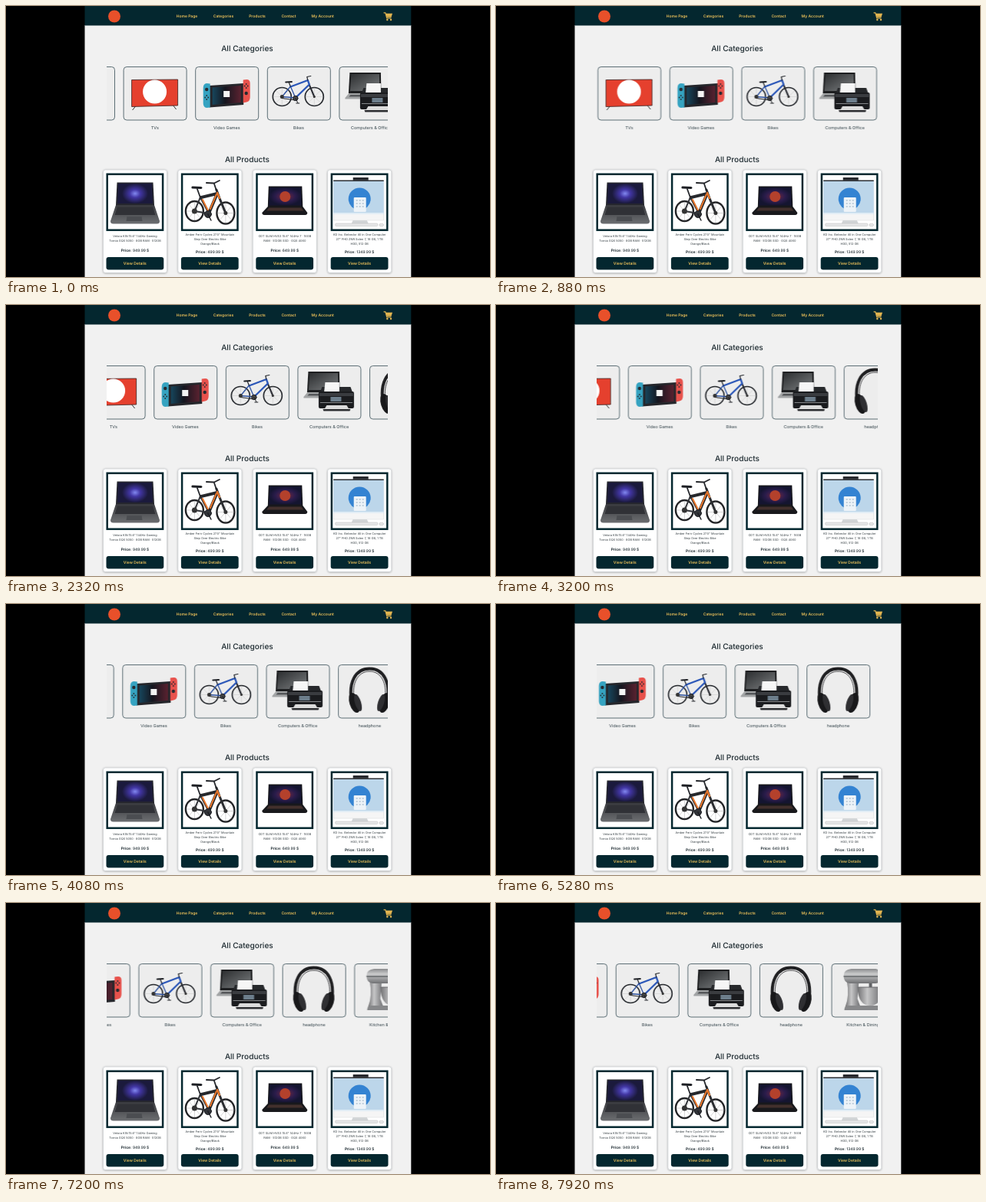
An HTML page for the animation above (8000 ms loop, 630 by 354 pixels).

```html
<!DOCTYPE html>
<html lang="en">
<head>
<meta charset="utf-8">
<title>Shop</title>
<style>
html, body { margin: 0; width: 100%; height: 100%; overflow: hidden; background: #000; }
svg { display: block; width: 630px; height: 354px; }
text { font-family: Inter, "Open Sans", sans-serif; text-anchor: middle; text-rendering: geometricPrecision; fill: #1d2a30; }
.nav text, .btn { font-size: 5px; font-weight: 600; fill: #efc25a; }
.head { font-size: 10.1px; font-weight: 500; }
.label { font-size: 5.5px; font-weight: 400; fill: #33434a; }
.desc { font-size: 3.9px; fill: #333c40; }
.price { font-size: 4.9px; font-weight: 500; }
.price tspan { font-weight: 700; }
#track { animation: slide 8s steps(100) infinite; }
@keyframes slide { to { transform: translateX(-186px); } }
</style>
</head>
<body>
<svg viewBox="0 0 630 354">
  <defs>
    <clipPath id="strip"><rect x="131.5" y="76" width="365.5" height="90"/></clipPath>
    <linearGradient id="steel">
      <stop offset="0" stop-color="#707072"/><stop offset=".4" stop-color="#c6c6c7"/><stop offset="1" stop-color="#6a6b6e"/>
    </linearGradient>
    <linearGradient id="chrome" x2="0" y2="1">
      <stop offset="0" stop-color="#8a8b8d"/><stop offset=".35" stop-color="#c9cacb"/><stop offset="1" stop-color="#707174"/>
    </linearGradient>
    <linearGradient id="glass" x2="1" y2="1">
      <stop offset="0" stop-color="#2d2f31"/><stop offset="1" stop-color="#7b7e80"/>
    </linearGradient>
    <linearGradient id="play">
      <stop offset="0" stop-color="#17465c"/><stop offset=".45" stop-color="#15161f"/><stop offset="1" stop-color="#5a2230"/>
    </linearGradient>
    <linearGradient id="deck" x2="0" y2="1">
      <stop offset="0" stop-color="#3a3b3f"/><stop offset="1" stop-color="#6c6e71"/>
    </linearGradient>
    <radialGradient id="violet">
      <stop offset="0" stop-color="#8288f0"/><stop offset=".4" stop-color="#4236a4"/><stop offset="1" stop-color="#1b1a3c"/>
    </radialGradient>
    <radialGradient id="ember">
      <stop offset="0" stop-color="#7a2a3c"/><stop offset=".6" stop-color="#2b1c4c"/><stop offset="1" stop-color="#141530"/>
    </radialGradient>
    <filter id="soft" x="-10%" y="-10%" width="120%" height="120%"><feDropShadow dx="0" dy=".5" stdDeviation="1" flood-opacity=".35"/></filter>

    <g id="tv">
      <path d="M16 52l-4 5M65 51l4 5" stroke="#333" fill="none"/>
      <path d="M11 17.5L71 17V51L11 52.5Z" fill="#e5402e" stroke="#3a2020" stroke-width=".8"/>
      <circle cx="41" cy="33" r="15.5" fill="#fff"/>
    </g>

    <g id="console">
      <path d="M18.5 25L63 22V50L18.5 53.5Z" fill="#25262b"/>
      <path d="M22.500 27.500L59.500 25V47L22.500 50Z" fill="url(#play)"/>
      <rect x="37" y="32" width="8" height="8" fill="#f4f4f4"/>
      <path d="M19.500 22.500V53.500L15 54Q10.500 53.500 10.500 48V28Q10.500 22.500 15 22Z" fill="#35a3c1"/>
      <path d="M62.500 17.500L67 17Q71.500 17 71.500 22V40Q71.500 45.500 67 46.500L62.500 47.500Z" fill="#e8524c"/>
      <g fill="#262a30">
        <circle cx="15" cy="30" r="2.200"/><circle cx="66.500" cy="35" r="2.200"/>
        <circle cx="15" cy="38" r=".9"/><circle cx="15" cy="43" r=".9"/><circle cx="13" cy="40.500" r=".9"/><circle cx="17" cy="40.500" r=".9"/>
        <circle cx="66.500" cy="23" r=".9"/><circle cx="66.500" cy="28" r=".9"/><circle cx="64.500" cy="25.500" r=".9"/><circle cx="68.500" cy="25.500" r=".9"/>
      </g>
    </g>

    <g id="bike" fill="none" stroke-linecap="round" stroke-linejoin="round">
      <g stroke="#24272c" stroke-width="1.700"><circle cx="19.500" cy="39.500" r="12"/><circle cx="61.500" cy="39.500" r="12"/></g>
      <path d="M19.500 28V51M8 39.500H31M11.500 31.500L27.500 47.500M27.500 31.500L11.500 47.500M61.500 28V51M50 39.500H73M53.500 31.500L69.500 47.500M69.500 31.500L53.500 47.500" stroke="#aaa" stroke-width=".3"/>
      <path d="M55 24L61.500 39.500" stroke="#2a2c33" stroke-width="2"/>
      <path d="M19.500 39.500L30.500 26L37 41Z" stroke="#2b50a0" stroke-width="1.300"/>
      <path d="M37 41L55 23.500L53 18L30.500 26.500" stroke="#2a56b8" stroke-width="2.300"/>
      <path d="M30.500 26L28.500 21M53 18L52 13.500L57 12.500M19.500 41.500L37 44" stroke="#23262b" stroke-width="1.200"/>
      <path d="M24.500 20.500L32 20" stroke="#1d1f24" stroke-width="2.200"/>
      <circle cx="37" cy="41.500" r="3.200" fill="#444" stroke="#1d1f24"/>
      <circle cx="19.500" cy="39.500" r="2.500" fill="#333"/><circle cx="61.500" cy="39.500" r="1.500" fill="#333"/>
      <path d="M37 41.500L40 47.500M38 48H42" stroke="#1d1f24"/>
    </g>

    <g id="office">
      <path d="M13 35L8 41V42.500H44V34Z" fill="#a2a4a5"/>
      <path d="M15 37H34L32 39.500H13Z" fill="#55575a"/>
      <path d="M14 8H54.500L55 35H12.500Z" fill="#1e1f21"/>
      <path d="M16 10H52.500L53 32H14.500Z" fill="url(#glass)"/>
      <path d="M32 28H69L72 36H29Z" fill="#26282b"/>
      <path d="M36 22H54.500V36H34.500Z" fill="#f6f6f6"/>
      <rect x="27.500" y="34" width="46" height="22" rx="2" fill="#1b1c1f"/>
      <rect x="28.500" y="36" width="44" height="4" fill="#3a3c40"/>
      <rect x="43" y="41" width="14" height="6" fill="#6d7e8c"/>
      <rect x="29.500" y="48" width="42" height="1" fill="#85888b"/>
      <path d="M38 52H64L67 57H35Z" fill="#dcdcdc"/>
      <path d="M33 57H69L68 59.500H34Z" fill="#2c2d30"/>
    </g>

    <g id="phones">
      <path d="M17.500 47C14 24 22 5.500 41 5.500S68 24 64.500 47" fill="none" stroke="#202022" stroke-width="4"/>
      <path d="M20.500 40C19 21 28 9 41 9S63 21 61.500 40" fill="none" stroke="#454548" stroke-width="1"/>
      <g fill="#18181a">
        <ellipse cx="21.500" cy="50" rx="6.500" ry="13.500" transform="rotate(-17 21.500 50)"/>
        <ellipse cx="60.500" cy="50" rx="6.500" ry="13.500" transform="rotate(17 60.500 50)"/>
      </g>
      <g fill="#2f2f32">
        <ellipse cx="26" cy="50" rx="4" ry="11.500" transform="rotate(-17 26 50)"/>
        <ellipse cx="56" cy="50" rx="4" ry="11.500" transform="rotate(17 56 50)"/>
      </g>
    </g>

    <g id="mixer">
      <path d="M20 22H36L34 46L38 57H18Q24 42 20 22Z" fill="url(#steel)"/>
      <path d="M17 60Q17 55 23 55H66V61H17Z" fill="#87888a"/>
      <path d="M51 25V36" stroke="#5f6164" stroke-width="4"/>
      <path d="M34 31H66Q66 55 50.500 55T34 31Z" fill="url(#steel)"/>
      <path d="M34 31H66" stroke="#6a6b6e" stroke-width="1"/>
      <path d="M16 16Q16 8 26 7H58Q67 9 67 17T58 26H24Q16 25 16 16Z" fill="url(#chrome)"/>
      <path d="M16 17H67" stroke="#66686b" stroke-width="1.500"/>
    </g>

    <g id="laptopA">
      <path d="M14 11.500H61L62.500 41H12.500Z" fill="#25262e"/>
      <path d="M15.500 13H59.500L60.500 39H14.500Z" fill="#1b1a3c"/>
      <ellipse cx="37.500" cy="26" rx="17" ry="13" fill="url(#violet)"/>
      <path d="M12.500 41H62.500L69.500 62Q69.500 65.500 66 65.500H9Q5.500 65.500 5.500 62Z" fill="url(#deck)"/>
      <path d="M14.500 43.500H60.500L64 54H11Z" fill="#303136"/>
      <path d="M27 56H46L47 62H26Z" fill="#4b4d51"/>
    </g>

    <g id="ebike" fill="none" stroke-linecap="round" stroke-linejoin="round">
      <g stroke="#222326" stroke-width="2.400"><ellipse cx="17.500" cy="49" rx="11.500" ry="13"/><ellipse cx="58" cy="51.500" rx="11.500" ry="14"/></g>
      <path d="M17.500 37V61M7 49H28M10 40L25 58M25 40L10 58M58 38V65M47 51.500H69M50 42L66 61M66 42L50 61" stroke="#999" stroke-width=".4"/>
      <path d="M46 21L50 32L58 51.500" stroke="#2b2d31" stroke-width="3"/>
      <path d="M17.500 49L25 31L36 52Z" stroke="#33353a" stroke-width="2"/>
      <path d="M36 52L47 26L26 31" stroke="#26282c" stroke-width="4"/>
      <path d="M38 46L46 27M28 34L35 48" stroke="#e9762a" stroke-width="2"/>
      <path d="M47 25L50 32" stroke="#e9762a" stroke-width="2.400"/>
      <path d="M25 31L21 20M46 22L43 13M33 12L43 12.500L50 9" stroke="#24262b" stroke-width="1.800"/>
      <path d="M15 18L26 18.500" stroke="#1d1f24" stroke-width="3"/>
      <circle cx="35" cy="53" r="4.500" fill="#33353a" stroke="#1d1f24"/>
      <path d="M35 53L39 61" stroke="#1d1f24" stroke-width="1.500"/>
      <circle cx="17.500" cy="49" r="3.500" fill="#333"/><circle cx="58" cy="51.500" r="2.500" fill="#333"/>
    </g>

    <g id="laptopB">
      <path d="M16.500 16.500H60L61 43H15.500Z" fill="#17171c"/>
      <path d="M18 18H58.500L59.500 41.500H17Z" fill="url(#ember)"/>
      <circle cx="38" cy="30" r="7" fill="#b4412c"/>
      <path d="M15.500 43H61L67 51Q67 54 64 54H11Q8 54 8 51Z" fill="#19191c"/>
      <path d="M17 44.500H59L62 48.500H14Z" fill="#42302c"/>
    </g>

    <g id="desktop">
      <rect x="29" y="5" width="20" height="5" fill="#26282c"/>
      <path d="M30 58H46L49 65.500H27Z" fill="#d2d5d7"/>
      <rect x="3.500" y="9" width="65.500" height="52" fill="#f5f5f5" stroke="#d5d8da" stroke-width=".5"/>
      <rect x="3.500" y="9" width="65.500" height="44" fill="#bcd6ea"/>
      <rect x="3.500" y="8.500" width="65.500" height="1.500" fill="#2d3136"/>
      <circle cx="37.500" cy="33" r="14.500" fill="#3483d2"/>
      <rect x="30" y="31" width="16" height="19" rx="1" fill="#edf3f8"/>
      <path d="M33 35H43M33 39H43M33 43H43" stroke="#90a9bd" stroke-dasharray="2 2"/>
      <rect x="3.500" y="51" width="65.500" height="2" fill="#e1edf5"/>
      <rect x="6" y="65" width="55" height="3.500" rx="1" fill="#e5e6e7" stroke="#bbb" stroke-width=".5"/>
      <ellipse cx="66" cy="67" rx="3" ry="1.800" fill="#e5e6e7" stroke="#bbb" stroke-width=".5"/>
    </g>
  </defs>

  <rect x="102.500" y="25" width="424.800" height="329" fill="#f1f1f1"/>
  <rect x="102.500" width="424.800" height="25.500" fill="#04272f"/>
  <circle cx="141" cy="13.500" r="8" fill="#e8502a"/>
  <g class="nav">
    <text x="235.500" y="15.200">Home Page</text>
    <text x="283" y="15.200">Categories</text>
    <text x="327" y="15.200">Products</text>
    <text x="368" y="15.200">Contact</text>
    <text x="412.200" y="15.200">My Account</text>
  </g>
  <g fill="#e0b450">
    <path d="M491.500 8.800H493.800L495.800 15.800H501.500" fill="none" stroke="#e0b450" stroke-width="1.200"/>
    <path d="M494 9.800H503L501.500 14.800H495.400Z"/>
    <circle cx="496.300" cy="18" r="1.200"/><circle cx="501" cy="18" r="1.200"/>
  </g>
  <text class="head" x="314" y="59">All Categories</text>
  <text class="head" x="314" y="204">All Products</text>
  <g clip-path="url(#strip)"><g id="track"></g></g>
  <g id="shop"></g>
</svg>
<script>
const pitch = 93.6, firstX = 59;
const categories = [
  ["", ""], ["tv", "TVs"], ["console", "Video Games"], ["bike", "Bikes"],
  ["office", "Computers &amp; Office"], ["phones", "headphone"], ["mixer", "Kitchen &amp; Dining"]
];
const products = [
  ["laptopA", "949.99", ['Velora KIN 15.6" 144Hz Gaming', "Tornia GQX 5050 · 8GB RAM · 512GB"]],
  ["ebike", "499.99", ['Amber Fern Cycles 27.5" Mountain', "Step Over Electric Bike", "Orange/Black"]],
  ["laptopB", "649.99", ['ODT SLIM HV53 15.6" 144Hz 7 · 16GB', "RAM · 512GB SSD · GQX 4060"]],
  ["desktop", "1349.99", ["KD Inc. Belvedor All in One Computer", '27" FHD ZNR Solen 7, 16 GB, 1 TB', "HDD, 512 GB"]]
];

const text = (cls, x, y, s) => `<text class="${cls}" x="${x}" y="${y}">${s}</text>`;

const category = ([art, name], i) => `<g transform="translate(${firstX + i * pitch} 79)">
  <rect x=".5" y=".5" width="82" height="69.500" rx="4" fill="#ededed" stroke="#4c6068" stroke-width=".9"/>
  ${art && `<use href="#${art}"/>`}${text("label", 41.2, 81.6, name)}</g>`;

const product = ([art, price, lines], i) => {
  const tall = lines.length > 2;
  const desc = lines.map((s, n) => text("desc", 41.5, (tall ? 86 : 88) + n * 5.8, s)).join("");
  return `<g transform="translate(${126.5 + i * 97.4} 214)">
  <rect width="83" height="134.500" rx="3" fill="#fff" stroke="#c3c8cb" stroke-width=".6" filter="url(#soft)"/>
  <rect x="5.200" y="5.700" width="72.400" height="73" fill="#fff" stroke="#04272f" stroke-width="2.500"/>
  <use href="#${art}" x="4" y="5"/>${desc}
  ${text("price", 41.5, tall ? 109 : 107.3, `<tspan>Price:</tspan> ${price} $`)}
  <rect x="4" y="114" width="74.800" height="16.500" rx="3" fill="#04272f"/>
  ${text("btn", 41.3, 124, "View Details")}</g>`;
};

document.getElementById("track").innerHTML = categories.map(category).join("");
document.getElementById("shop").innerHTML = products.map(product).join("");
</script>
</body>
</html>
```
